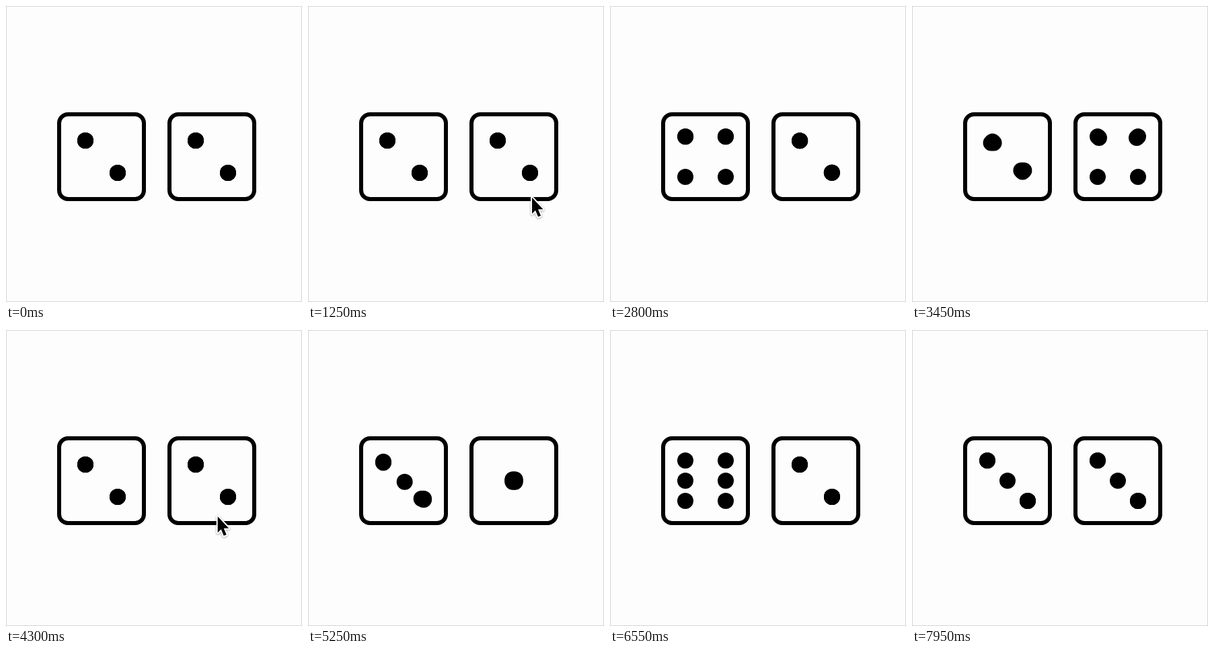
Recreate the animation shown at these times as an HTML page. Size 440x440 px, loop 8000 ms.

```html
<!DOCTYPE html>
<html lang="en">
<head>
<meta charset="utf-8">
<title>Rolling dice</title>
<style>
  html, body { margin: 0; width: 100%; height: 100%; overflow: hidden; background: #fdfdfd; }
  svg { display: block; width: 100vw; height: 100vh; }
  #cursor { filter: drop-shadow(0 1.5px 1.5px rgba(0, 0, 0, .35)); }
</style>
</head>
<body>
<svg viewBox="0 0 440 440">
  <defs>
    <clipPath id="face"><rect x="-60" y="-60" width="120" height="120" rx="10"/></clipPath>
  </defs>
  <rect width="440" height="440" fill="#fdfdfd"/>
  <rect x=".5" y=".5" width="439" height="439" fill="none" stroke="#d4d4d4"/>
  <g id="dice"></g>
  <path id="cursor" d="M1.5 3V27L6.5 22L10.5 31.5L14.5 29.8L10.5 20.5H18Z"
    fill="#000" stroke="#fff" stroke-width="4" stroke-linejoin="round" paint-order="stroke"/>
</svg>
<script>
const LOOP = 8000;
const NS = 'http://www.w3.org/2000/svg';

// Each face places six pips on cells 0-8 of a 3 x 3 grid; spare pips stack.
const faces = ['', '444444', '000888', '004888', '068022', '468024', '368025'];

// A roll changes the face every `step` ms; digits are the faces shown.
const rolls = [
  { start: 1380, step: 468, left: '241452', right: '2632542' },
  { start: 4300, step: 450, left: '253616', right: '241632' },
  { start: 7500, step: 450, left: '63', right: '23' }
];

// The pointer moves and rests in turn: `at` holds the switch times.
const visits = [
  { at: [200, 300, 650, 950, 1250, 1390], via: [[266, 370], [303, 246], [331, 281], [406, 398]] },
  { at: [3590, 4100, 4300, 4390], via: [[424, 420], [313, 274], [330, 305]] },
  { at: [6950, 7050, 7350, 7440], via: [[348, 307], [253, 247], [285, 342]] }
];

const lerp = (a, b, k) => a + (b - a) * k;
const mix = (p, q, k) => p.map((v, i) => lerp(v, q[i], k));

// cubic-bezier(.5, 0, .5, 3): slow start, wide overshoot
function ease(u) {
  let lo = 0, hi = 1;
  for (let i = 0; i < 24; i++) {
    const s = (lo + hi) / 2;
    if (1.5 * s - 1.5 * s * s + s ** 3 < u) lo = s; else hi = s;
  }
  return 9 * lo * lo - 8 * lo ** 3;
}

function spot(face, i) {
  const cell = +faces[face][i];
  const gap = +face === 2 ? 24 : 30;
  return [(cell % 3 - 1) * gap, (Math.floor(cell / 3) - 1) * gap];
}

function add(parent, name, attrs) {
  const node = document.createElementNS(NS, name);
  for (const key in attrs) node.setAttribute(key, attrs[key]);
  return parent.appendChild(node);
}

function makeDie(x, side) {
  const g = add(document.getElementById('dice'), 'g', { transform: `translate(${x} 224)` });
  const inner = add(g, 'g', { 'clip-path': 'url(#face)' });
  const pips = Array.from({ length: 6 }, () => add(inner, 'circle', { r: 12 }));
  add(g, 'rect', { x: -63, y: -63, width: 126, height: 126, rx: 13, fill: 'none', stroke: '#000', 'stroke-width': 6 });
  return { side, pips };
}

const dice = [makeDie(142, 'left'), makeDie(306, 'right')];
const cursor = document.getElementById('cursor');

function faceAt(side, t) {
  const roll = rolls.filter(r => t >= r.start).pop();
  if (!roll) return { from: 2, to: 2, k: 1 };
  const shown = roll[side];
  const turn = Math.min((t - roll.start) / roll.step, shown.length - 1);
  const i = Math.min(Math.floor(turn), shown.length - 2);
  return { from: shown[i], to: shown[i + 1], k: turn - i === 1 ? 1 : ease(turn - i) };
}

function pointerAt(t) {
  const visit = visits.find(({ at }) => t >= at[0] && t < at[at.length - 1]);
  if (!visit) return null;
  const { at, via } = visit;
  const i = at.findIndex(end => end > t) - 1;
  const k = (t - at[i]) / (at[i + 1] - at[i]);
  return mix(via[Math.ceil(i / 2)], via[Math.floor(i / 2) + 1], k);
}

function draw(t) {
  for (const { side, pips } of dice) {
    const { from, to, k } = faceAt(side, t);
    pips.forEach((pip, i) => {
      const [x, y] = mix(spot(from, i), spot(to, i), k);
      pip.setAttribute('cx', x);
      pip.setAttribute('cy', y);
    });
  }
  const tip = pointerAt(t);
  cursor.setAttribute('visibility', tip ? 'visible' : 'hidden');
  if (tip) cursor.setAttribute('transform', `translate(${tip})`);
}

const begin = performance.now();
function tick() {
  draw((performance.now() - begin) % LOOP);
  requestAnimationFrame(tick);
}
draw(0);
requestAnimationFrame(tick);
</script>
</body>
</html>
```
